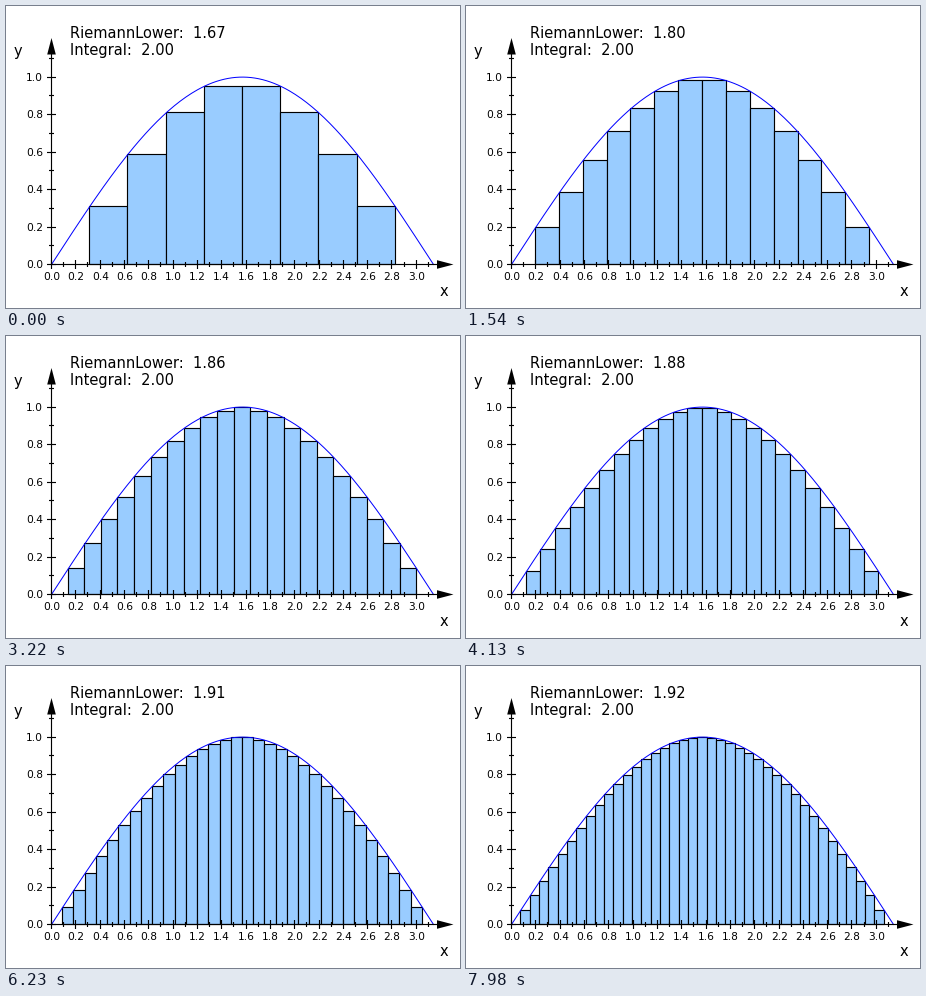
Animation, 454 px wide and 302 px high, one loop 8 s. Source, as a matplotlib script:

```python
import numpy as np
import matplotlib.pyplot as plt
from matplotlib.animation import FuncAnimation
from matplotlib.collections import LineCollection, PolyCollection

W, H, DPI = 454, 302, 100
PX = 72 / DPI                 # points per pixel
X0, Y0 = 45.5, 258.5          # origin of the plot in pixels
SX, SY = 121.6, 187.4         # pixels per unit
LOOP, STEP = 8000, 20
LINE = 1.15 * PX
SMALL, LARGE = 10.6, 14.6     # text sizes in pixels

plt.rcParams.update({
    "font.family": "DejaVu Sans",
    "text.hinting": "force_autohint",
    "text.hinting_factor": 8,
    "toolbar": "None",
})


def to_px(x, y):
    return np.column_stack([X0 + SX * np.asarray(x), Y0 - SY * np.asarray(y)])


def crisp(points):
    """Move points to the centres of their pixels."""
    return np.floor(points) + 0.5


# (first change, number of changes); changes in a run are 210 ms apart
RUNS = [(280, 5), (1540, 4), (2590, 5), (3920, 4), (4970, 5), (6230, 4), (7350, 4)]
CHANGES = np.array([start + 210 * k for start, count in RUNS for k in range(count)])

fig = plt.figure(figsize=(W / DPI, H / DPI), dpi=DPI, facecolor="white")
ax = fig.add_axes([0, 0, 1, 1])
ax.set_xlim(0, W)
ax.set_ylim(H, 0)
ax.axis("off")


def label(x, y, text, size, ha="left"):
    return ax.text(x, y, text, fontsize=size * PX, ha=ha, va="baseline",
                   color="black", zorder=5)


def draw_axes():
    lines = [[(X0, Y0), (X0, 40)], [(X0, Y0), (438, Y0)]]
    for i in range(32):
        x, r = np.floor(X0 + SX * i / 10) + 0.5, 2.5 if i % 2 else 4.5
        lines.append([(x, Y0 - r), (x, Y0 + r)])
        if i % 2 == 0:
            label(x, 274, f"{i / 10:.1f}", SMALL, "center")
    for i in range(12):
        y, r = np.floor(Y0 - SY * i / 10) + 0.5, 2.5 if i % 2 else 4.5
        lines.append([(X0 - r, y), (X0 + r, y)])
        if i % 2 == 0 and i <= 10:
            label(37, y + 3.5, f"{i / 10:.1f}", SMALL, "right")
    ax.add_collection(LineCollection(lines, colors="black", linewidths=LINE,
                                     capstyle="butt", zorder=4, snap=False))
    heads = [[(X0, 32), (X0 - 4.3, 48.5), (X0 + 4.3, 48.5)],
             [(447.5, Y0), (431, Y0 - 4.3), (431, Y0 + 4.3)]]
    ax.add_collection(PolyCollection(heads, facecolors="black",
                                     edgecolors="none", zorder=4, snap=False))
    label(8, 50, "y", LARGE)
    label(433.5, 290, "x", LARGE)


draw_axes()
t = np.linspace(0, np.pi, 200)
ax.plot(*to_px(t, np.sin(t)).T, color="#0000ff", lw=PX, zorder=3)

bars = PolyCollection([], facecolors="#99ccff", edgecolors="black",
                      linewidths=LINE, joinstyle="miter", zorder=2, snap=False)
ax.add_collection(bars)
lower = label(64, 32, "", LARGE)
label(64, 49, "Integral:  2.00", LARGE)


def update(frame):
    now = (frame + 0.5) * STEP
    n = 10 + int(np.searchsorted(CHANGES, now, side="right"))
    edges = np.linspace(0, np.pi, n + 1)
    s = np.sin(edges)
    low = np.minimum(s[:-1], s[1:])
    bars.set_verts([crisp(to_px([a, a, b, b], [0, h, h, 0]))
                    for a, b, h in zip(edges[1:-2], edges[2:-1], low[1:-1])])
    lower.set_text(f"RiemannLower:  {low.sum() * np.pi / n:.2f}")
    return bars, lower


anim = FuncAnimation(fig, update, frames=LOOP // STEP, interval=STEP,
                     init_func=lambda: update(0), repeat=True, repeat_delay=0)
plt.show()
```
